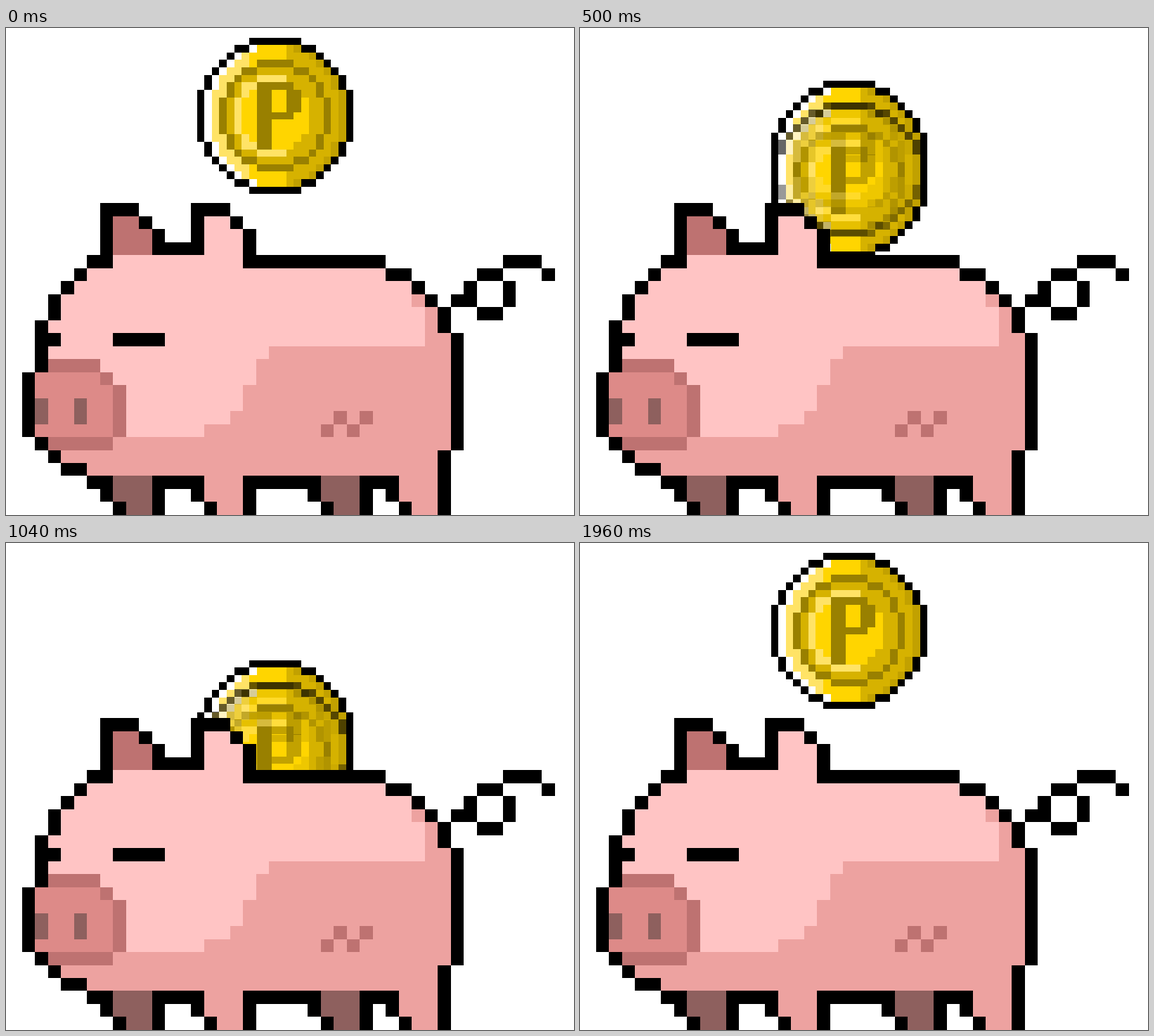
An HTML page with a canvas for the animation above (1980 ms loop, 808 by 693 pixels).

```html
<!DOCTYPE html>
<html lang="en">
<head>
<meta charset="utf-8">
<title>Piggy bank</title>
<style>
html, body { margin: 0; width: 100%; height: 100%; overflow: hidden; background: #fff; }
canvas { display: block; }
</style>
</head>
<body>
<canvas id="stage" width="808" height="693"></canvas>
<script>
const W = 808, H = 693;
const ctx = document.getElementById('stage').getContext('2d');

function sprite(width, height) {
  const canvas = document.createElement('canvas');
  canvas.width = width;
  canvas.height = height;
  return canvas;
}

// Returns a function that fills whole cells of a grid.
function grid(g, x0, y0, pitch) {
  const px = n => Math.round(x0 + n * pitch), py = n => Math.round(y0 + n * pitch);
  return (color, x, y, w = 1, h = 1) => {
    g.fillStyle = color;
    g.fillRect(px(x), py(y), px(x + w) - px(x), py(y + h) - py(y));
  };
}

function makeCoin() {
  const canvas = sprite(223, 223);
  const cell = grid(canvas.getContext('2d'), -0.3, -0.3, 10.6);
  const white = '#fff', light = '#ffe366', gold = '#ffd500';
  const dark = '#d6b200', shade = '#c2a100', olive = '#998000';

  // A pixel disc; trim cuts cells off the left (+) or right (-) of each row.
  function disc(color, r, trim = 0, from = 0) {
    for (let y = 0; y <= 20; y++) {
      const half = Math.floor(Math.sqrt(r * r - (y - 10) ** 2));
      const left = Math.max(from, 10 - half + Math.max(trim, 0));
      const right = 11 + half + Math.min(trim, 0);
      if (right > left) cell(color, left, y, right - left);
    }
  }

  disc('#000', 10.6);
  disc(white, 9.6);
  disc(light, 9.6, 1);
  disc(gold, 9.6, 1, 7);
  disc(shade, 9.6, 0, 12);
  disc(dark, 9.6, -1, 12);
  disc(olive, 7.4);
  disc(dark, 6.45);
  disc(light, 5.7);
  disc(dark, 5.7, 0, 12);
  disc(gold, 4.7);

  // The letter P
  cell(olive, 8, 6, 2, 9);
  cell(olive, 10, 6, 3);
  cell(olive, 12, 7, 2, 3);
  cell(olive, 10, 10, 3);
  return canvas;
}

function makePig() {
  const canvas = sprite(W, H), g = canvas.getContext('2d');
  const cell = grid(g, 22.9, 249.4, 18.48);
  const pink = '#ffc4c4', rose = '#eda2a0', flesh = '#dd8a88';
  const dusk = '#be7271', brown = '#8e605e', black = '#000';

  // Calls draw for each cell whose centre lies inside all the paths.
  function each(paths, draw) {
    const areas = paths.map(d => new Path2D(d));
    for (let y = 0; y < 24; y++) {
      for (let x = 0; x < 42; x++) {
        if (areas.every(a => g.isPointInPath(a, x + 0.5, y + 0.5))) draw(x, y);
      }
    }
  }
  const paint = (color, ...paths) => each(paths, (x, y) => cell(color, x, y));
  const leg = x => `M${x} 21h3v3h-2l-1 -1.4z`;

  const body = 'M7.2 4L3 7.5 2.2 9.5 2 18.7 5.2 20.6V21H32V19H33V10H32V8.5L28.4 5.5 28 5H17V2H16V1H14V4Z';
  const snout = 'M1 13H6V14H7V18H1Z';
  const parts = [
    [pink, body],
    [dusk, 'M7 1H8.8L10 2.4V4H7Z'],
    [flesh, snout],
    [rose, leg(14) + leg(29)],
    [brown, leg(7) + leg(23)],
    ['#fff', 'M35 6h2v2h-2z']  // hole in the curl of the tail
  ];

  // The outline is every part grown by one cell.
  for (const [, path] of parts) {
    each([path], (x, y) => {
      cell(black, x - 1, y, 3);
      cell(black, x, y - 1, 1, 3);
    });
  }
  for (const [color, path] of parts) paint(color, path);

  paint(rose, body, 'M30 7L31 8V11H18.8L16.6 15.6 14.4 17.5V18H0V21H34V7Z');
  paint(dusk, 'M2 12H6V13H7V14H8V18H7V19H2Z');
  paint(flesh, snout);
  for (const x of [1, 4]) cell(brown, x, 15, 1, 2);
  for (let i = 0; i < 4; i++) cell(dusk, 23 + i, 17 - i % 2);

  // Ear corners, eyes, ends of the tail
  cell(black, 6, 0);
  cell(black, 13, 0);
  cell(black, 2, 10);
  cell(black, 7, 10, 4);
  cell(black, 33, 7);
  cell(black, 37, 4, 3);
  cell(black, 40, 5);
  return canvas;
}

const coin = makeCoin(), pig = makePig();
const STEPS = 11, STEP = 180, HOLD = 100, TICK = 20;

function drawCoin(step, alpha, mode) {
  if (step === STEPS - 1) return;  // the last step has no coin
  ctx.globalAlpha = alpha;
  ctx.globalCompositeOperation = mode;
  ctx.drawImage(coin, 272, Math.floor(14 + 30.72 * step));
}

function draw(now) {
  const t = now % (STEPS * STEP), step = Math.floor(t / STEP);
  const next = (step + 1) % STEPS;
  const mix = Math.max(0, Math.floor((t % STEP - HOLD) / TICK) + 1) / 5;

  ctx.clearRect(0, 0, W, H);
  drawCoin(step, 1, 'source-over');
  // The next coin blends where the two overlap and shows outside only past half way.
  drawCoin(next, mix, 'source-atop');
  if (mix > 0.5) drawCoin(next, 1, 'destination-over');
  ctx.globalAlpha = 1;
  ctx.globalCompositeOperation = 'source-over';
  ctx.drawImage(pig, 0, 0);
}

const start = performance.now();
function loop() {
  draw(performance.now() - start);
  requestAnimationFrame(loop);
}
loop();
</script>
</body>
</html>
```
